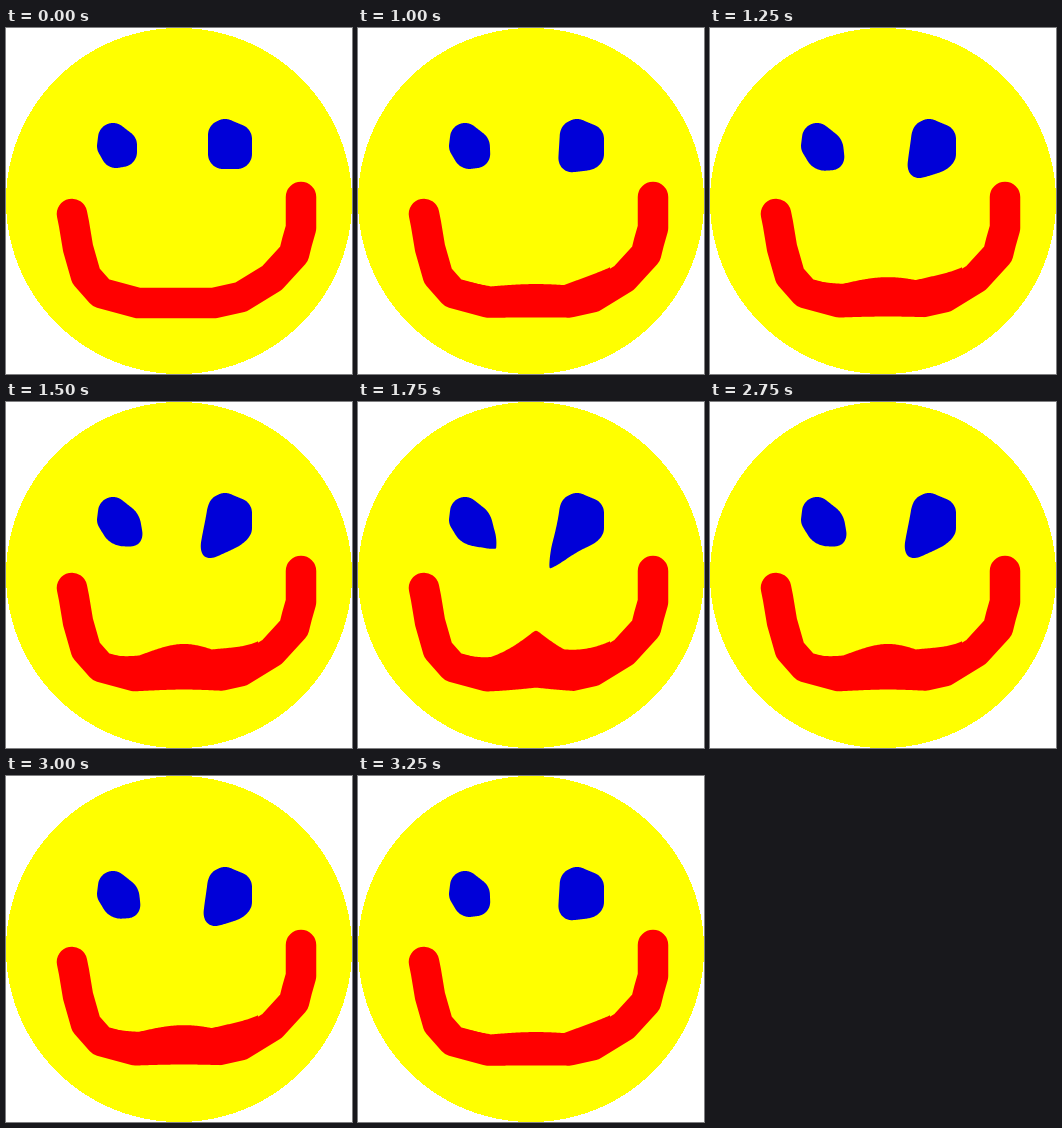
Recreate the animation shown at these times as an HTML page with a canvas. Size 346x346 px, loop 3500 ms.

```html
<!DOCTYPE html>
<html lang="en">
<head>
<meta charset="utf-8">
<title>Smile morph</title>
<style>
  html, body { margin: 0; width: 100%; height: 100%; overflow: hidden; background: #fff; }
  canvas { display: block; width: 100vmin; height: 100vmin; }
</style>
</head>
<body>
<canvas id="stage" width="346" height="346"></canvas>
<script>
const ctx = document.getElementById('stage').getContext('2d');
const SIZE = 346, STEP = 250, LOOP = 3500;
const YELLOW = '#ff0', RED = '#f00', BLUE = '#0000d8';
const STRENGTH = [0, 0.12, 0.33, 0.55, 1];

// Brush positions; each eye has one corner that gets pulled outwards.
const EYES = [
  { dabs: [[107, 110], [116, 117], [116, 124], [110, 125], [106, 118]],
    corner: [126, 135], pull: [12, 11.5] },
  { dabs: [[219, 106], [231, 111], [231, 126], [217, 126], [217, 107]],
    corner: [206, 138], pull: [-16, 31] }
];
const SMILE = [[66, 186], [68, 196], [72, 220], [80, 248], [95, 265], [132, 275], [208, 275],
  [235, 269], [266, 250], [288, 226], [291, 214], [295, 200], [295, 169]];
const BRUSH = 15;
const LIP_X = 178, LIP_REACH = 74;

// Influence of a pull at a distance: round when weak, pointed when strong
function falloff(dist, reach, s) {
  const u = Math.min(dist / reach, 1);
  return (1 - u ** (2 - s ** 3)) ** 2;
}

function fillPath(points, color) {
  ctx.beginPath();
  for (const [x, y] of points) ctx.lineTo(x, y);
  ctx.fillStyle = color;
  ctx.fill();
}

// Dense outline around a convex group of round dabs
function outline(dabs) {
  const rim = [];
  for (let i = 0; i < 120; i++) {
    const a = i / 120 * 2 * Math.PI, nx = Math.cos(a), ny = Math.sin(a);
    const reach = ([x, y]) => x * nx + y * ny;
    const [x, y] = dabs.reduce((best, d) => reach(d) > reach(best) ? d : best);
    rim.push([x + BRUSH * nx, y + BRUSH * ny]);
  }
  return rim.flatMap(([x, y], i) => {
    const [x2, y2] = rim[(i + 1) % rim.length];
    const n = Math.ceil(Math.hypot(x2 - x, y2 - y));
    return Array.from({ length: n }, (_, k) => [x + (x2 - x) * k / n, y + (y2 - y) * k / n]);
  });
}

for (const eye of EYES) eye.rim = outline(eye.dabs);

function drawEye({ rim, corner, pull }, s) {
  fillPath(rim.map(([x, y]) => {
    const f = s * falloff(Math.hypot(x - corner[0], y - corner[1]), 40, s);
    return [x + pull[0] * f, y + pull[1] * f];
  }), BLUE);
}

// Hump rising from a base line, filled down to the floor
function hump(base, height, floor, s, color) {
  const left = LIP_X - LIP_REACH, right = LIP_X + LIP_REACH;
  const points = [[left, floor]];
  for (let x = left; x <= right; x++) {
    const dist = Math.hypot(x - LIP_X, 2);
    points.push([x, base(x) - height * s * falloff(dist, LIP_REACH, s)]);
  }
  fillPath([...points, [right, floor]], color);
}

function drawMouth(s) {
  ctx.beginPath();
  for (const [x, y] of SMILE) ctx.lineTo(x, y);
  ctx.strokeStyle = RED;
  ctx.lineWidth = BRUSH * 2 + 0.5;
  ctx.lineCap = ctx.lineJoin = 'round';
  ctx.stroke();
  if (!s) return;
  const lip = x => 260 - Math.max(0, 133 - x) * 0.27 - Math.max(0, x - 206) * 0.45;
  // Keep the lip's base inside the stroke
  hump(lip, 33, 262, s, RED);
  hump(() => 290, 4.5, 291, s, YELLOW);
}

// Hard-edged disc, one row at a time
function drawFace() {
  const r = SIZE / 2;
  ctx.fillStyle = YELLOW;
  for (let y = 0; y < SIZE; y++) {
    const half = Math.round(Math.sqrt(r * r - (y + 0.5 - r) ** 2));
    ctx.fillRect(r - half, y, half * 2, 1);
  }
}

function frame() {
  const k = Math.floor(performance.now() % LOOP / STEP);
  const level = Math.max(0, Math.min(k - 3, 14 - k, 4));
  const s = STRENGTH[level];
  ctx.clearRect(0, 0, SIZE, SIZE);
  drawFace();
  for (const eye of EYES) drawEye(eye, s);
  drawMouth(s);
  requestAnimationFrame(frame);
}
frame();
</script>
</body>
</html>
```
